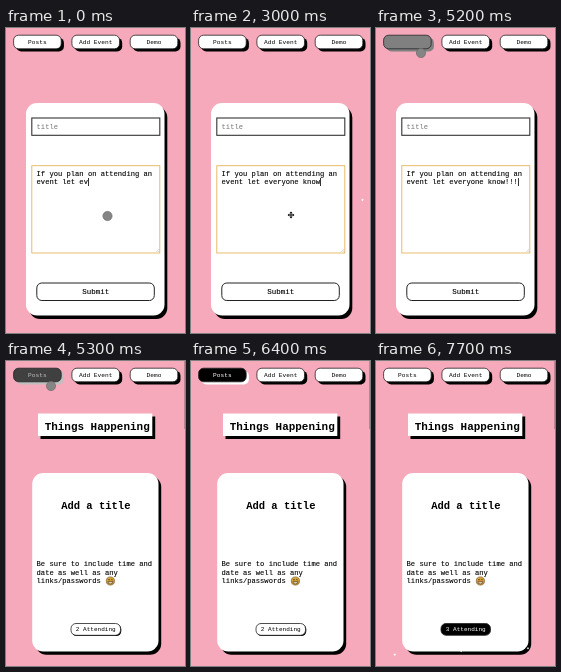
These frames come from a looping animation (179x305 px, 7800 ms). An HTML page:

```html
<!DOCTYPE html>
<html lang="en">
<head>
<meta charset="utf-8">
<title>Event board</title>
<style>
html, body { margin: 0; width: 100%; height: 100%; overflow: hidden; background: #f6a9bb; }
svg { display: block; width: 100vw; height: 100vh; }
text { font-family: "Liberation Mono", "DejaVu Sans Mono", monospace; white-space: pre; fill: #000; }
.mid { text-anchor: middle; }
.bold { font-weight: 700; }
.body { font-size: 7.13px; stroke: #000; stroke-width: .12px; }
</style>
</head>
<body>
<svg id="stage" viewBox="0 0 179 305" preserveAspectRatio="none">
  <rect width="179" height="305" fill="#f6a9bb"/>
  <g id="nav"></g>

  <g id="formPage">
    <rect x="23" y="78.5" width="138.3" height="212.5" rx="11"/>
    <rect x="20" y="75" width="138.5" height="212.5" rx="11" fill="#fff"/>
    <rect x="25.8" y="90" width="128" height="17.3" fill="#fff" stroke="#333" stroke-width="1.1"/>
    <text x="30.6" y="101" font-size="7.13" style="fill:#757575">title</text>
    <rect x="25.8" y="137.7" width="128" height="87.3" fill="#fff" stroke="#e6b55c" stroke-width=".9"/>
    <path d="M150.3 224l3-3M152.3 224l1-1" stroke="#999" stroke-width=".4"/>
    <text class="body" x="30.6" y="148.3">If you plan on attending an</text>
    <text class="body" id="typed" x="30.6" y="156.4"></text>
    <rect id="caret" y="150" width=".8" height="8"/>
    <rect x="30.8" y="255" width="117.5" height="17.5" rx="5" fill="#fff" stroke="#222" stroke-width="1"/>
    <text class="body mid" x="89.8" y="266.3" style="font-size:7.5px">Submit</text>
  </g>

  <g id="postsPage">
    <rect x="34.5" y="55.5" width="114.7" height="22.5"/>
    <rect x="32" y="52.5" width="114.3" height="22.5" fill="#fff"/>
    <text class="mid bold" x="91.2" y="68.7" font-size="10.95">Things Happening</text>
    <rect x="29.5" y="115" width="125.7" height="178.7" rx="11"/>
    <rect x="26.2" y="112" width="126.3" height="178.5" rx="11" fill="#fff"/>
    <text class="mid bold" x="89.8" y="148" font-size="10.5">Add a title</text>
    <text class="body" x="30.6" y="205.3">Be sure to include time and</text>
    <text class="body" x="30.6" y="213.5">date as well as any</text>
    <text class="body" x="30.6" y="222">links/passwords</text>
    <g transform="translate(104.4 220)">
      <circle r="4.1" fill="#d9a63c" stroke="#6b4a1c" stroke-width=".6"/>
      <path d="M-2.6 .7H2.6A2.6 2.3 0 0 1-2.6 .7Z" fill="#e9dcc0" stroke="#5a3510" stroke-width=".7"/>
      <path d="M-2.3-1q.9-1.2 1.8 0M.5-1q.9-1.2 1.8 0" fill="none" stroke="#4a2c0c" stroke-width=".8"/>
    </g>
    <g id="attend"></g>
    <rect x="178" width=".8" height="68" fill="#8f6a74" opacity=".7"/>
  </g>

  <path id="sparkles" fill="#fff" opacity=".92"/>
  <circle id="dot" r="4.6" fill="#858585" stroke="#6c6c6c" stroke-width=".7"/>
  <g id="cross" transform="translate(100 187)">
    <path d="M-2.5 0H2.5M0-2.5V2.5" stroke="#000" stroke-width=".9"/>
    <path d="M-3.4 0l1.7-1.5v3zM3.4 0l-1.7-1.5v3zM0-3.4l-1.5 1.7h3zM0 3.4l-1.5-1.7h3z"/>
  </g>
</svg>
<script>
const WIDTH = 179, HEIGHT = 305, LOOP = 7800, STEP = 100;
const NS = "http://www.w3.org/2000/svg";
const $ = id => document.getElementById(id);
const ramp = (t, from, to) => Math.max(0, Math.min(1, (t - from) / (to - from)));
const ease = p => p * p * (3 - 2 * p);
const lerp = (a, b, p) => a + (b - a) * p;
const show = (id, on) => $(id).setAttribute("visibility", on ? "visible" : "hidden");
const grey = v => { const n = Math.round(v * 255); return `rgb(${n},${n},${n})`; };

function add(parent, tag, attrs) {
  const el = document.createElementNS(NS, tag);
  for (const key in attrs) el.setAttribute(key, attrs[key]);
  return parent.appendChild(el);
}

// A button whose face, shadow and label swap between black and white.
function makeButton(parent, label, x, y, w, h, depth, size) {
  const box = { width: w, height: h, rx: 5 };
  const shadow = add(parent, "rect", { ...box, x: x + depth, y: y + depth });
  const face = add(parent, "rect", { ...box, x, y, stroke: "#222", "stroke-width": .8 });
  const text = add(parent, "text", { x: x + w / 2, y: y + h / 2 + size * .33, class: "mid", "font-size": size });
  text.textContent = label;
  const invert = p => {
    face.setAttribute("fill", grey(1 - p));
    shadow.setAttribute("fill", grey(p));
    text.style.fill = grey(p);
  };
  invert(0);
  return { text, invert };
}

const [posts] = ["Posts", "Add Event", "Demo"].map((label, i) =>
  makeButton($("nav"), label, 7.6 + i * 58.3, 7.2, 47.6, 13.6, 2.7, 6.2));
const attend = makeButton($("attend"), "2 Attending", 65, 262.5, 49.5, 11.8, .8, 6.05);

const bursts = [
  { text: "event let ev", start: -5000, gap: 180 },
  { text: "eryone ", start: 200, gap: 180 },
  { text: "know", start: 1600, gap: 200 },
  { text: "!!!", start: 3300, gap: 200 }
];
const typedAt = t => bursts.map(({ text, start, gap }) =>
  text.slice(0, Math.max(0, Math.floor((t - start) / gap) + 1))).join("");

let seed = 17;
const random = () => (seed = seed * 16807 % 2147483647) / 2147483647;
const sparkles = Array.from({ length: 64 }, () => ({
  peak: random() * LOOP,
  x: random() * WIDTH,
  y: random() * HEIGHT,
  size: 1.3 + random() * .7
}));

// Each sparkle swells and fades while drifting down.
function star({ peak, x, y, size }, t) {
  const age = (t - peak) / 250;
  if (Math.abs(age) >= 1) return "";
  const r = size * (1 - age * age), k = r * .45, d = r - k;
  return `M${x + age * 1.5} ${y + age * 4 - r}l${k} ${d} ${d} ${k} ${-d} ${k} ${-k} ${d} ${-k} ${-d} ${-d} ${-k} ${d} ${-k}z`;
}

function render(t) {
  const onPosts = t >= 5300;
  show("formPage", !onPosts);
  show("postsPage", onPosts);

  const typed = typedAt(t);
  $("typed").textContent = typed;
  $("caret").setAttribute("x", 30.8 + $("typed").getComputedTextLength());
  $("caret").setAttribute("opacity", Math.floor(t / 500) % 2 && t > 1500 ? 0 : 1);

  posts.invert(ramp(t, 5000, 5400) - ramp(t, 6900, 7300));
  attend.invert(ramp(t, 6600, 7000));
  attend.text.textContent = `${t < 7000 ? 2 : 3} Attending`;

  $("sparkles").setAttribute("d", sparkles.map(s => star(s, t)).join(""));

  const glide = ease(ramp(t, 3700, 4800));
  const dragging = t >= 2900 && t < 3100;
  $("dot").setAttribute("transform", `translate(${lerp(101.5, 45, glide)} ${lerp(188, 25, glide)})`);
  show("dot", t < 5800 && !dragging);
  show("cross", dragging);
}

const start = performance.now();
function tick() {
  const t = (performance.now() - start) % LOOP;
  render(Math.floor(t / STEP) * STEP);
  requestAnimationFrame(tick);
}
render(0);
requestAnimationFrame(tick);
</script>
</body>
</html>
```
